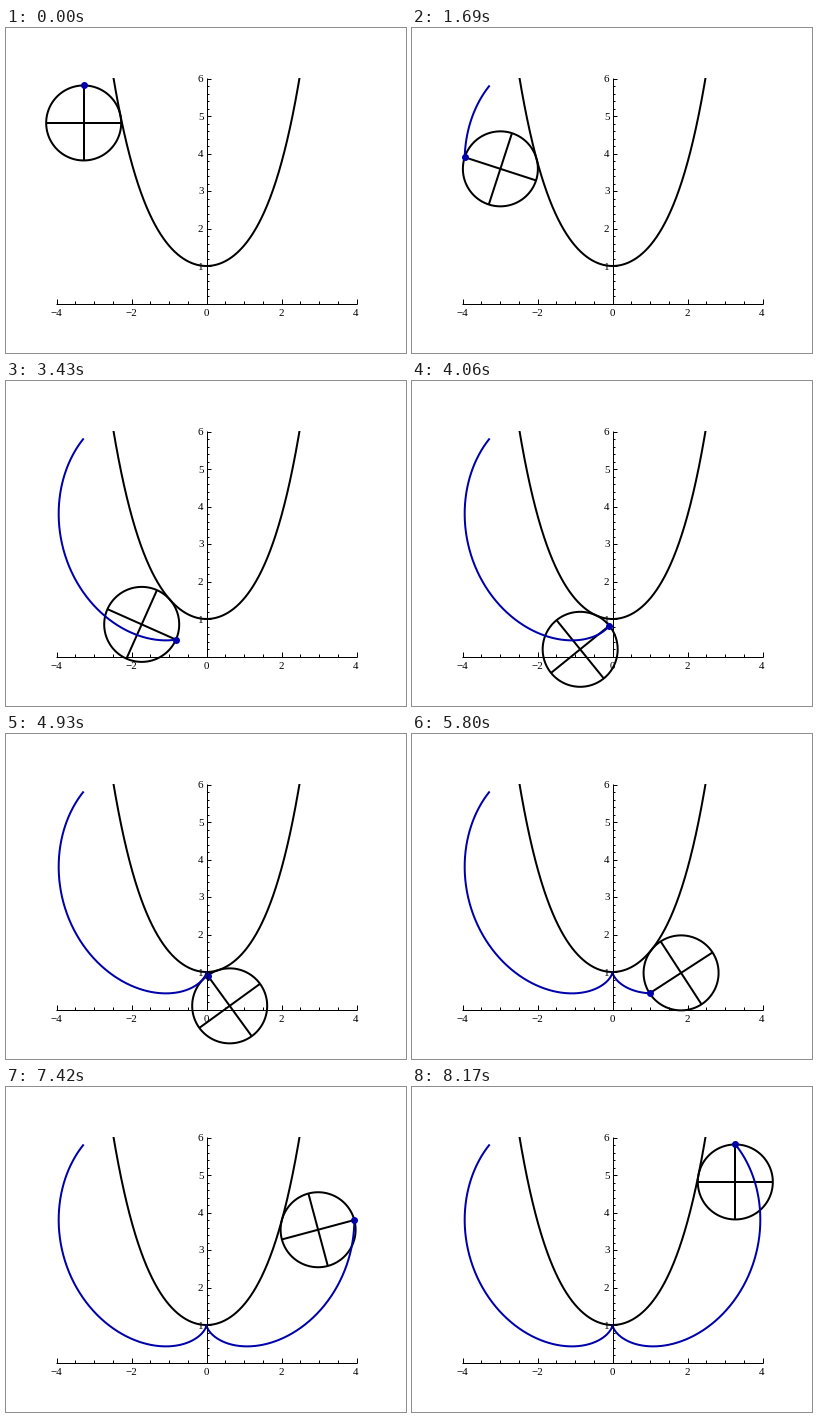
Recreate the animation shown at these times as a matplotlib script. Size 400 by 325 pixels, loop 9.17 s.

```python
"""A unit wheel rolls along the underside of a catenary; a rim point leaves a trail."""
import numpy as np
import matplotlib.pyplot as plt
from matplotlib.animation import FuncAnimation
from matplotlib.collections import LineCollection
from matplotlib.patches import Rectangle

W, H, DPI = 400, 325, 100
X0, Y0, UNIT = 200.5, 275.5, 37.5
PX = 72 / DPI
BLUE = "#0000aa"
TICK_MS, LOOP_MS = 14, 9170
HOLD_MS, STEP_MS, STEPS = 1000, 30, 240
SUB = 4  # trail samples per step


def to_px(x, y):
    return X0 + UNIT * np.asarray(x), Y0 - UNIT * np.asarray(y)


def wheel(turn):
    """Wheel centre and rim point after turning by `turn` from the cusp."""
    s = turn / 2
    for _ in range(30):  # solve arc length + tangent angle = turn
        s = s - (s + np.arctan(s) - turn) / (1 + 1 / (1 + s * s))
    c = np.sqrt(1 + s * s)
    cx, cy = np.arcsinh(s) + s / c, c - 1 / c
    ang = np.pi / 2 + turn
    return cx, cy, cx + np.cos(ang), cy + np.sin(ang)


turns = np.linspace(-2 * np.pi, 2 * np.pi, STEPS * SUB + 1)
CX, CY, RX, RY = wheel(turns)
TRAIL_X, TRAIL_Y = to_px(RX, RY)

fig = plt.figure(figsize=(W / DPI, H / DPI), dpi=DPI, facecolor="white")
ax = fig.add_axes([0, 0, 1, 1])
ax.set_xlim(0, W)
ax.set_ylim(H, 0)
ax.axis("off")


def stroke(color="black", z=2):
    line, = ax.plot([], [], color=color, lw=2 * PX, zorder=z,
                    solid_capstyle="butt", solid_joinstyle="round")
    return line


# Catenary, cut flat at y = 6
t = np.linspace(-2.5, 2.5, 201)
curve = stroke()
curve.set_data(*to_px(t, np.cosh(t)))
curve.set_clip_path(Rectangle((0, 50), W, H - 50, transform=ax.transData))

rim, spoke_a, spoke_b = stroke(z=3), stroke(z=3), stroke(z=3)
trail = stroke(BLUE, 4)
dot, = ax.plot([], [], "o", color=BLUE, ms=7 * PX, mew=0, zorder=5)
dot.set_snap(False)

# Axes, ticks and labels
segs = [[(50, Y0), (351, Y0)], [(X0, 50), (X0, 276)]]
for i in range(-8, 9):
    x = X0 + i * UNIT / 2
    segs.append([(x, Y0), (x, Y0 - (4.5 if i % 4 == 0 else 2.5))])
for i in range(1, 31):
    y = Y0 - i * UNIT / 5
    segs.append([(X0, y), (X0 + (4.5 if i % 5 == 0 else 2.5), y)])
ax.add_collection(LineCollection(segs, colors="black", linewidths=PX, zorder=6),
                  autolim=False)

font = dict(family="Liberation Serif", size=11 * PX, color="black", zorder=7)
for v in range(-4, 5, 2):
    ax.text(X0 + v * UNIT - 0.5, 288, str(v).replace("-", "\u2212"),
            ha="center", va="baseline", **font)
for v in range(1, 7):
    ax.text(197.5, Y0 - v * UNIT + 3.5, str(v), ha="right", va="baseline", **font)

phi = np.linspace(0, 2 * np.pi, 121)


def draw(i):
    ms = i * TICK_MS + TICK_MS - 2  # a step shows in the frame where it begins
    step = 0 if ms < HOLD_MS else min(STEPS, 1 + (ms - HOLD_MS) // STEP_MS)
    n = step * SUB
    cx, cy = CX[n], CY[n]
    rim.set_data(*to_px(cx + np.cos(phi), cy + np.sin(phi)))
    dx, dy = RX[n] - cx, RY[n] - cy
    ends = np.array([-1, 1])
    spoke_a.set_data(*to_px(cx + ends * dx, cy + ends * dy))
    spoke_b.set_data(*to_px(cx - ends * dy, cy + ends * dx))
    m = n + 1 if n else 0
    trail.set_data(TRAIL_X[:m], TRAIL_Y[:m])
    dot.set_data([TRAIL_X[n]], [TRAIL_Y[n]])
    return rim, spoke_a, spoke_b, trail, dot


anim = FuncAnimation(fig, draw, frames=LOOP_MS // TICK_MS, interval=TICK_MS,
                     repeat=True, repeat_delay=0, blit=False)
plt.show()
```
